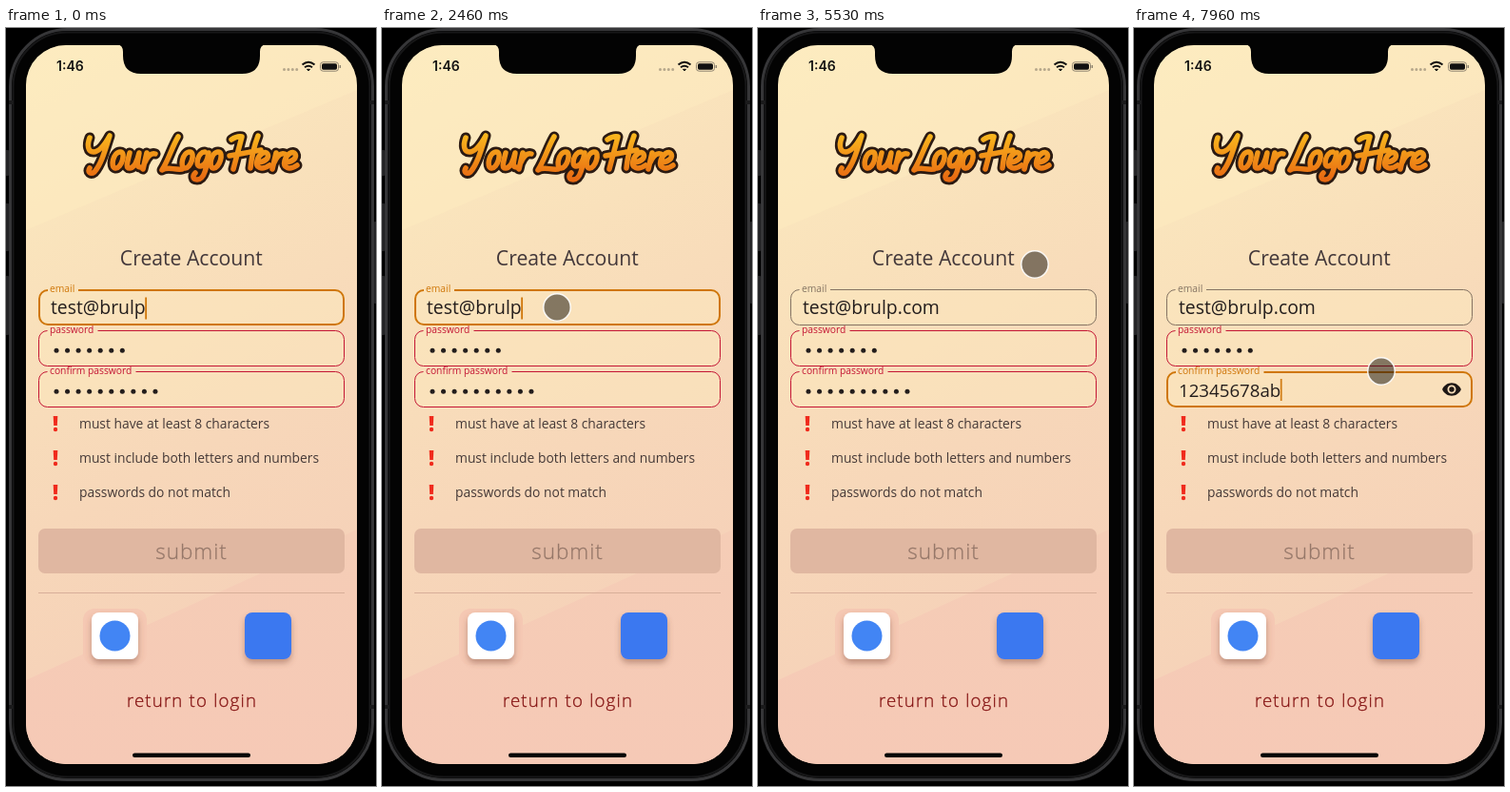
An HTML page for the animation above (8000 ms loop, 389x795 px).

```html
<!DOCTYPE html>
<html lang="en">
<head>
<meta charset="utf-8">
<title>Create Account</title>
<style>
  html, body { margin: 0; width: 100%; height: 100%; overflow: hidden; background: #000; }
  svg { display: block; width: 389px; height: 795px; }
  text { font-family: "Open Sans", "Noto Sans", sans-serif; white-space: pre; }
  .label { font-size: 10.3px; }
  .value { font-size: 19.4px; fill: #231d1c; }
  .rule { font-size: 13.85px; fill: #453937; }
  .light { font-weight: 300; stroke-width: .3; }
</style>
</head>
<body>
<svg viewBox="0 0 389 795">
  <defs>
    <linearGradient id="paper" x1="0" y1="0" x2=".25" y2="1">
      <stop offset="0" stop-color="#fcecc0"/>
      <stop offset=".35" stop-color="#f9e1bb"/>
      <stop offset=".65" stop-color="#f7d7b9"/>
      <stop offset="1" stop-color="#f5cfb8"/>
    </linearGradient>
    <linearGradient id="blush" x1="0" y1="0" x2="0" y2="1">
      <stop offset="0" stop-color="#f5cdb6"/>
      <stop offset="1" stop-color="#f6c9b6"/>
    </linearGradient>
    <linearGradient id="flame" gradientUnits="userSpaceOnUse" x1="0" y1="112" x2="0" y2="158">
      <stop offset="0" stop-color="#f9b71e"/>
      <stop offset="1" stop-color="#e86a12"/>
    </linearGradient>
    <filter id="shade" x="-30%" y="-30%" width="160%" height="170%">
      <feDropShadow dx="0" dy="4" stdDeviation="3" flood-color="#7a4a38" flood-opacity=".45"/>
    </filter>
    <clipPath id="screen"><rect x="21" y="18" width="348" height="754" rx="42"/></clipPath>
    <g id="bang">
      <path d="M-2.3-8h4.6l-.5 10h-3.6z"/>
      <circle cy="6" r="2.2"/>
    </g>
    <path id="o" d="M9 130C2 130-2 146 4 147S16 130 9 130z"/>
    <path id="e" d="M1 141c8-1 12-5 10-9s-9 0-11 7 4 11 13 5"/>
    <path id="r" d="M4 131L0 148M2 141q5-11 11-9"/>
    <g id="lettering" fill="none" stroke-linecap="round" stroke-linejoin="round">
      <path d="M88 115c-3 8-2 15 4 15s12-8 17-17c-5 16-9 30-16 38-4 3-8 0-5-4"/>
      <use href="#o" x="111"/>
      <path d="M130 131c-2 9-5 16 0 16s8-8 10-16c-1 8-4 15 1 15"/>
      <use href="#r" x="144"/>
      <path d="M181 114c-7 12-10 24-17 35 6-4 12 0 21-1"/>
      <use href="#o" x="184"/>
      <path d="M209 130c-7 0-11 15-5 15s8-8 9-14c-2 14-4 28-12 28-5 0-5-4-2-7"/>
      <use href="#o" x="214"/>
      <path d="M237 117q6-4 11-3l-9 34M265 113c-5 13-7 24-8 34M235 134l33-6"/>
      <use href="#e" x="264"/>
      <use href="#r" x="280"/>
      <use href="#e" x="293"/>
    </g>
  </defs>

  <g fill="#242426">
    <rect x="-2" y="128" width="5" height="27" rx="1"/>
    <rect x="-2" y="184" width="5" height="50" rx="1"/>
    <rect x="-2" y="260" width="5" height="62" rx="1"/>
    <rect x="387" y="203" width="5" height="86" rx="1"/>
  </g>
  <rect x="4.5" y="1.5" width="381" height="787" rx="60" fill="#030303" stroke="#363638" stroke-width="3"/>
  <rect x="7.5" y="4.5" width="375" height="781" rx="57" fill="none" stroke="#171718" stroke-width="2"/>
  <path d="M3 78h5M382 78h5M3 712h5M382 712h5" stroke="#1b1b1c" stroke-width="4"/>

  <g clip-path="url(#screen)">
    <rect x="21" y="18" width="348" height="754" fill="url(#paper)"/>
    <path d="M21 18H369V65L21 212Z" fill="#fdebbe" opacity=".45"/>
    <path d="M21 684L369 526V772H21Z" fill="url(#blush)"/>
  </g>
  <path d="M117 17q6 1 6 8v4q0 19 19 19h106q19 0 19-19v-4q0-7 6-8z" fill="#030303"/>

  <text x="53" y="44.500" style="font:600 14px Inter,sans-serif" fill="#111">1:46</text>
  <path d="M292.500 43.500h14" stroke="#b6a78b" stroke-width="3" stroke-linecap="round" stroke-dasharray="0 4.400"/>
  <g fill="none" stroke="#111" stroke-width="2">
    <path d="M311.500 38.500q6.500-5.600 13 0M314 41.300q4-3.200 8 0"/>
    <path d="M316.500 43.300h3l-1.500 1.700z" stroke-width="1" fill="#111"/>
  </g>
  <rect x="330.500" y="35.800" width="19" height="9.400" rx="2.800" fill="none" stroke="#8f8470"/>
  <rect x="332" y="37.300" width="16" height="6.400" rx="1.600" fill="#111"/>
  <path d="M351.300 39v3" stroke="#8f8470" stroke-width="1.500"/>

  <g role="img" aria-label="Your Logo Here">
    <use href="#lettering" stroke="#2b1a12" stroke-width="11"/>
    <use href="#lettering" stroke="url(#flame)" stroke-width="5.500"/>
  </g>

  <text x="194.800" y="249" text-anchor="middle" font-size="21.200" fill="#43383a">Create Account</text>

  <g id="fields"></g>
  <text class="value" id="email" x="47" y="300"></text>
  <text class="value" id="confirm" x="47" y="386.500" style="font-size:18.7px">12345678ab</text>
  <g id="dots"></g>
  <use id="warn" href="#bang" x="334" y="293" fill="#1d1715"/>
  <g id="eye" transform="translate(323.200 368.200) scale(.9)" fill="#1d1715">
    <path d="M12 4.500C7 4.500 2.730 7.610 1 12c1.730 4.390 6 7.500 11 7.500s9.270-3.110 11-7.500c-1.730-4.390-6-7.500-11-7.500zM12 17a5 5 0 1 1 0-10 5 5 0 0 1 0 10zM12 9a3 3 0 1 0 0 6 3 3 0 0 0 0-6z"/>
    <g id="slash" fill="none">
      <path d="M4.500 2.300L21.800 19.600" stroke="#f9dfba" stroke-width="2.400"/>
      <path d="M2.700 3.500L20.500 21.300" stroke="#1d1715" stroke-width="2"/>
    </g>
  </g>
  <rect id="caret" width="1.800" height="23" fill="#cf7608"/>

  <g id="rules"></g>

  <rect x="34" y="525" width="322" height="47" rx="7" fill="#e0b7a1"/>
  <text class="light" x="195" y="556.500" text-anchor="middle" font-size="22.500" letter-spacing="1" fill="#96786a" stroke="#96786a">submit</text>
  <path d="M34 592.500H356" stroke="#d8ae99"/>

  <rect x="81" y="609" width="67" height="59" rx="12" fill="#f5c8b3"/>
  <rect x="90" y="613" width="49" height="49" rx="8" fill="#fff" filter="url(#shade)"/>
  <circle cx="114.500" cy="637.500" r="16" fill="#4285f4"/>
  <rect x="251" y="613" width="49" height="49" rx="8" fill="#3a78f0" filter="url(#shade)"/>

  <text class="light" x="195.500" y="711.500" text-anchor="middle" font-size="18.600" letter-spacing="1.200" fill="#861414" stroke="#861414">return to login</text>
  <rect x="133" y="760.400" width="124" height="4.500" rx="2.250" fill="#050505"/>

  <circle id="pointer" r="14.250" fill="#0e0c08" fill-opacity=".5" stroke="#fff" stroke-opacity=".9" stroke-width="1.500"/>
</svg>

<script>
const LOOP = 8000;
const $ = id => document.getElementById(id);

function add(parent, tag, attrs, text = "") {
  const el = document.createElementNS("http://www.w3.org/2000/svg", tag);
  for (const key in attrs) el.setAttribute(key, attrs[key]);
  el.textContent = text;
  return parent.appendChild(el);
}

// Outline and label styles
const IDLE = { rgb: [132, 115, 98], width: 1 };
const ERROR = { rgb: [196, 22, 52], width: 1 };
const FOCUS = { rgb: [207, 118, 8], width: 2 };

// Rounded box with a gap for the label; the stroke grows inwards
function outlinePath(top, gapEnd, width) {
  const r = 9, left = 34 + width / 2, right = 356 - width / 2;
  const y = top + width / 2, side = 38 - width - 2 * r;
  const arc = (dx, dy) => `a${r} ${r} 0 0 1 ${dx} ${dy}`;
  return `M${gapEnd} ${y}H${right - r}${arc(r, r)}v${side}${arc(-r, r)}` +
         `H${left + r}${arc(-r, -r)}v${-side}${arc(r, -r)}`;
}

function makeField(label, top, gapEnd) {
  const g = $("fields");
  add(g, "rect", { x: 34.5, y: top + .5, width: 321, height: 37, rx: 9, fill: "#fce6bd", opacity: .6 });
  const outline = add(g, "path", { fill: "none" });
  const name = add(g, "text", { class: "label", x: 46, y: top + 3.1 }, label);
  return (from, to, k) => {
    const color = `rgb(${from.rgb.map((c, i) => Math.round(c + (to.rgb[i] - c) * k))})`;
    const width = from.width + (to.width - from.width) * k;
    outline.setAttribute("d", outlinePath(top, gapEnd, width));
    outline.setAttribute("stroke", color);
    outline.setAttribute("stroke-width", width);
    name.setAttribute("fill", color);
  };
}

const paintEmail = makeField("email", 274, 76);
const paintPassword = makeField("password", 317, 96.5);
const paintConfirm = makeField("confirm password", 360, 136.5);
paintPassword(ERROR, ERROR, 1);

function makeDots(parent, count, y) {
  for (let i = 0; i < count; i++) add(parent, "circle", { cx: 53 + i * 11.55, cy: y, r: 2.5, fill: "#231d1c" });
}
makeDots($("fields"), 7, 338.2);
makeDots($("dots"), 10, 381.2);

["must have at least 8 characters", "must include both letters and numbers", "passwords do not match"]
  .forEach((text, i) => {
    const y = 415 + i * 36;
    add($("rules"), "use", { href: "#bang", x: 52, y, fill: "#f02a1c" });
    add($("rules"), "text", { class: "rule", x: 77, y: y + 4.5 }, text);
  });

// Timelines: [start, value, fade duration]
const emailStates = [[0, FOCUS, 1], [1060, ERROR, 120], [2460, FOCUS, 1], [5110, IDLE, 1]];
const confirmStates = [[0, ERROR, 1], [6640, FOCUS, 100]];
const ADDRESS = "test@brulp.com";
const typed = [[0, 10], [3690, 11], [4050, 12], [4280, 13], [4640, 14]];
const caretStarts = [[-90], [2460], [2540], [3690], [4050], [4280], [4640], [6640], [6710], [7450]];
const REVEAL = 7450;
const pointerKeys = [
  [1590, 388, 214], [1650, 318, 214], [1700, 256, 222], [1760, 205, 239], [1850, 184, 268],
  [1940, 179, 298], [2000, 179, 304], [2110, 184, 293], [2620, 184, 293], [2700, 200, 287],
  [2790, 248, 267], [2880, 295, 245], [2970, 317, 238], [3689, 317, 238], [3690, 316, 238],
  [5529, 316, 238], [5530, 291, 248], [5830, 291, 248], [5930, 286, 273], [6060, 275, 345],
  [6150, 270, 383], [6230, 270, 391], [6680, 270, 391], [6780, 293, 388], [6870, 318, 382],
  [6960, 328, 382], [7680, 328, 382], [7780, 308, 376], [7880, 275, 364], [7960, 260, 360]
];

const clamp = x => Math.min(1, Math.max(0, x));
const lastIndex = (list, t) => list.findLastIndex(item => item[0] <= t);
const show = (id, on) => $(id).setAttribute("visibility", on ? "visible" : "hidden");

function paintState(paint, states, t) {
  const i = lastIndex(states, t), [start, state, fade] = states[i];
  paint(states[Math.max(0, i - 1)][1], state, i ? clamp((t - start) / fade) : 1);
  return state;
}

function blink(t) {
  const phase = (t - caretStarts[lastIndex(caretStarts, t)][0]) % 1000;
  return phase < 740 ? 1 - clamp((phase - 500) / 120) : clamp((phase - 860) / 110);
}

function pointerAt(t) {
  const i = lastIndex(pointerKeys, t);
  if (i < 0) return null;
  const [t0, x0, y0] = pointerKeys[i];
  const [t1, x1, y1] = pointerKeys[i + 1] || [t0 + 1, x0, y0];
  const k = clamp((t - t0) / (t1 - t0));
  return [x0 + (x1 - x0) * k, y0 + (y1 - y0) * k];
}

function render(t) {
  const emailState = paintState(paintEmail, emailStates, t);
  const confirmState = paintState(paintConfirm, confirmStates, t);
  const revealed = t >= REVEAL, confirming = confirmState === FOCUS;

  $("email").textContent = ADDRESS.slice(0, typed[lastIndex(typed, t)][1]);
  show("warn", emailState === ERROR);
  show("dots", !revealed);
  show("confirm", revealed);
  show("eye", confirming);
  show("slash", confirming && !revealed);

  const field = $(confirming ? "confirm" : "email");
  const caretX = confirming && !revealed ? 161 : 46.5 + field.getComputedTextLength();
  $("caret").setAttribute("x", caretX);
  $("caret").setAttribute("y", confirming ? 368 : 282.5);
  $("caret").setAttribute("opacity", confirming || emailState === FOCUS ? blink(t) : 0);

  const spot = pointerAt(t);
  show("pointer", spot);
  if (spot) $("pointer").setAttribute("transform", `translate(${spot})`);
}

const began = performance.now();
function tick() {
  render((performance.now() - began) % LOOP);
  requestAnimationFrame(tick);
}
tick();
</script>
</body>
</html>
```
